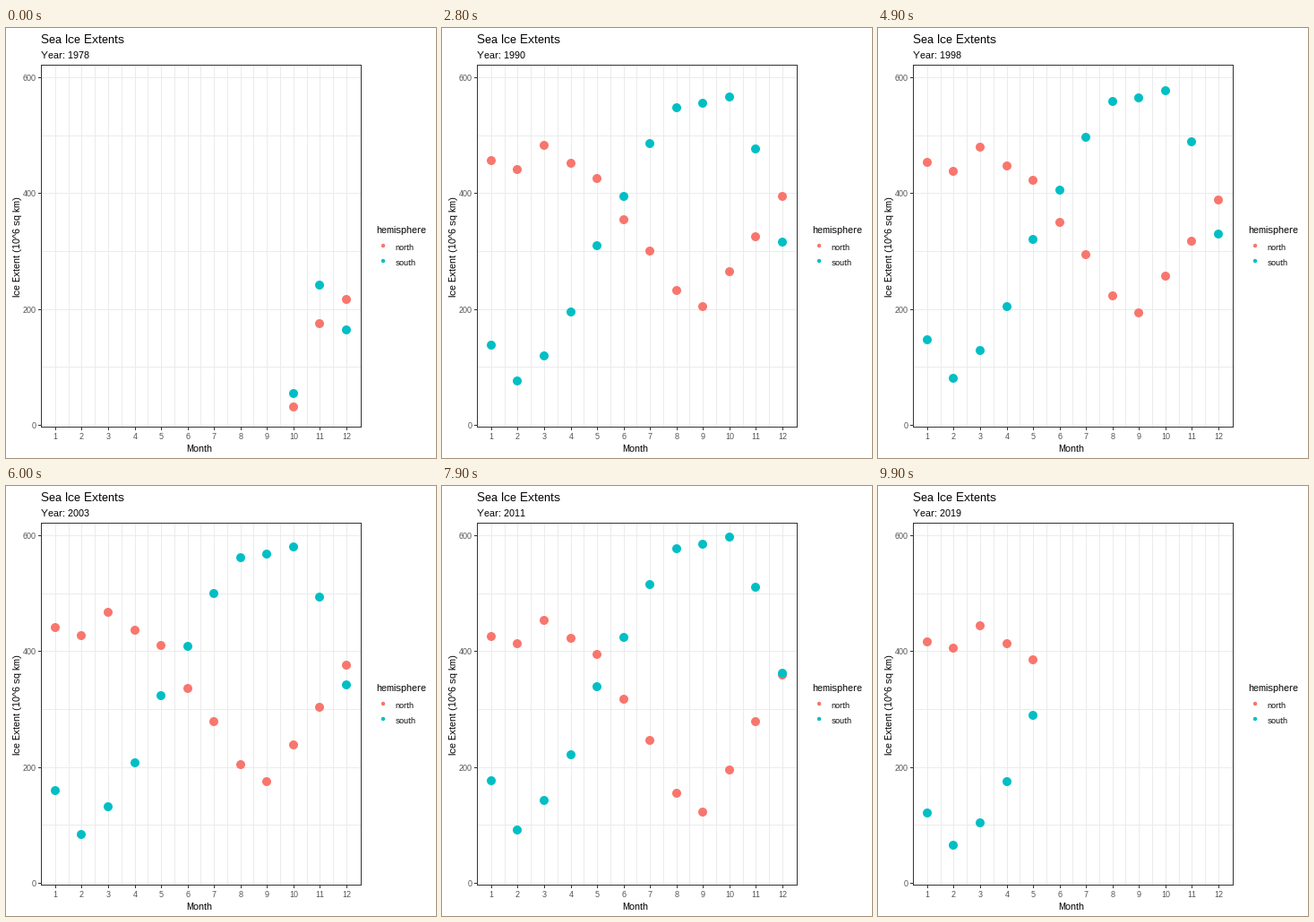
A matplotlib script for the animation above (10 s loop, 480 px wide and 480 px high).

```python
import numpy as np
import matplotlib.pyplot as plt
from matplotlib.animation import FuncAnimation
from matplotlib.patches import Circle, Rectangle

FRAMES, INTERVAL = 100, 100
FIRST, LAST = 1978, 2019
PT = 0.72  # points per pixel at 100 dpi
COLORS = {"north": "#F8766D", "south": "#00BFC4"}
YEARS = np.arange(FIRST, LAST + 1)
MONTHS = np.arange(1, 13)


def observed_days():
    """Every second day until August 1987, then daily, with one winter gap."""
    days = np.arange("1978-10-26", "2019-06-01", dtype="datetime64[D]")
    daily = days > np.datetime64("1987-08-20")
    gap = (days >= np.datetime64("1987-12-03")) & (days <= np.datetime64("1988-01-12"))
    return days[(daily | (np.arange(len(days)) % 2 == 0)) & ~gap]


DAYS = observed_days()
MONTH_START = DAYS.astype("datetime64[M]")
MONTH_INDEX = MONTH_START.astype(int) - (FIRST - 1970) * 12
month_len = ((MONTH_START + 1).astype("datetime64[D]")
             - MONTH_START.astype("datetime64[D]")).astype(int)
day = (DAYS - MONTH_START.astype("datetime64[D]")).astype(int) + 0.5
SEASON = MONTH_INDEX % 12 + day / month_len + 0.5  # middle of January is 1
TIME = FIRST + (MONTH_INDEX + day / month_len) / 12


def cycle(mean, waves):
    """Yearly curve from complex harmonics of the monthly means."""
    angle = 2 * np.pi * (SEASON - 1) / 12
    return mean + sum((c * np.exp(1j * k * angle)).real / np.sinc(k / 12)
                      for k, c in enumerate(waves, 1))


def bump(center, width):
    away = (SEASON - center + 6) % 12 - 6
    return np.exp(-(away / width) ** 2)


def drift(*keys):
    return np.interp(TIME, *zip(*keys))


def by_month(values):
    total = np.bincount(MONTH_INDEX, values, minlength=len(YEARS) * 12)
    return total.reshape(-1, 12)


north = cycle(11.77, [2.69 - 3.44j, 0.21 + 0.53j, -0.15 - 0.14j, 0.11 - 0.13j])
north += drift((1978.8, 0.9), (1984, 0.1), (1998, 0), (2007, -0.75), (2019, -1.2))
north += bump(8.8, 2) * drift((1984, 0.3), (1998.7, 0), (2006, -0.4), (2007.7, -1.2),
                              (2012.7, -1.8), (2014, -0.4), (2019, -0.7))

south = cycle(11.70, [-5.23 + 5.94j, -1.17 + 0.97j, -0.42 + 0.06j, -0.18 - 0.07j])
south += (1 - 0.5 * bump(2, 1)) * drift((1979, -0.2), (1990, -0.35), (1998, 0),
                                        (2008, 0.2), (2014, 1), (2015.4, 1),
                                        (2017, -1))
south += bump(0.5, 1) * drift((1998, 0), (2007.5, 0.9), (2014, 0.6), (2016, 0))

COUNTS = by_month(None)
EXTENT = {"north": by_month(north), "south": by_month(south)}
KEYS = np.round((FRAMES - 1) * (YEARS - FIRST) / (LAST - FIRST)).astype(int)


def state(name, k):
    """Rows of (month, extent) for one year."""
    has = COUNTS[k] > 0
    return np.column_stack([MONTHS[has], EXTENT[name][k][has]])


def pose(name, i):
    k = np.searchsorted(KEYS, i, side="right") - 1
    now = state(name, k)
    if KEYS[k] == i:
        return now
    after = state(name, k + 1)
    n = min(len(now), len(after))
    t = (i - KEYS[k]) / (KEYS[k + 1] - KEYS[k])
    return now[:n] * (1 - t) + after[:n] * t


def px(month):
    return round(54.9 + (month - 1) * 325 / 11)


def py(extent):
    return round(443 - extent * 388 / 600)


plt.rcParams.update({"font.family": "Liberation Sans",
                     "text.hinting": "native", "text.hinting_factor": 1})
fig = plt.figure(figsize=(4.8, 4.8), dpi=100, facecolor="white")
ax = fig.add_axes([0, 0, 1, 1])
ax.set(xlim=(0, 480), ylim=(480, 0))
ax.axis("off")


def bar(x, y, w, h, color, z=1):
    ax.add_patch(Rectangle((x, y), w, h, facecolor=color, lw=0, zorder=z))


def label(x, y, text, size=11, color="black", **kw):
    return ax.text(x, y, text, fontsize=size * PT, color=color, va="baseline", **kw)


def dot(x, y, r, color):
    return ax.add_patch(Circle((x, y), r, facecolor=color, lw=0, zorder=3))


GRID, INK, TICK = "#EBEBEB", "#333333", "#4D4D4D"
LEFT, TOP, RIGHT, BOTTOM = 39, 41, 396, 445
for m in np.arange(1, 12.5, 0.5):
    bar(px(m), TOP, 1, BOTTOM - TOP, GRID)
for v in range(0, 601, 100):
    bar(LEFT, py(v), RIGHT - LEFT, 1, GRID)
    if v % 200 == 0:
        bar(LEFT - 3, py(v), 3, 1, INK)
        label(34, py(v) + 4, str(v), 9, TICK, ha="right")
for m in MONTHS:
    bar(px(m), BOTTOM + 1, 1, 3, INK)
    label(px(m), 459, str(m), 9, TICK, ha="center")
for x in (LEFT, RIGHT):
    bar(x, TOP, 1, BOTTOM - TOP + 1, INK, 4)
for y in (TOP, BOTTOM):
    bar(LEFT, y, RIGHT - LEFT + 1, 1, INK, 4)

label(39, 17, "Sea Ice Extents", 13)
year_text = label(39, 34, "")
label(216, 473, "Month", ha="center")
label(16, 243.5, "Ice Extent (10^6 sq km)", rotation=90,
      rotation_mode="anchor", ha="center")
label(413, 229, "hemisphere")
for y, (name, color) in zip((243, 260), COLORS.items()):
    dot(421, y, 2.2, color)
    label(434.5, y + 5, name, 9)

dots = {name: [dot(0, 0, 5, color) for _ in MONTHS] for name, color in COLORS.items()}


def draw(i):
    year = FIRST + (LAST - FIRST) * i / (FRAMES - 1)
    year_text.set_text(f"Year: {round(year)}")
    for name, group in dots.items():
        rows = pose(name, i)
        for j, d in enumerate(group):
            d.set_visible(j < len(rows))
            if j < len(rows):
                month, extent = rows[j]
                d.center = px(month), py(extent)
    return [year_text, *dots["north"], *dots["south"]]


anim = FuncAnimation(fig, draw, frames=FRAMES, interval=INTERVAL,
                     repeat=True, repeat_delay=0, blit=False)
plt.show()
```
